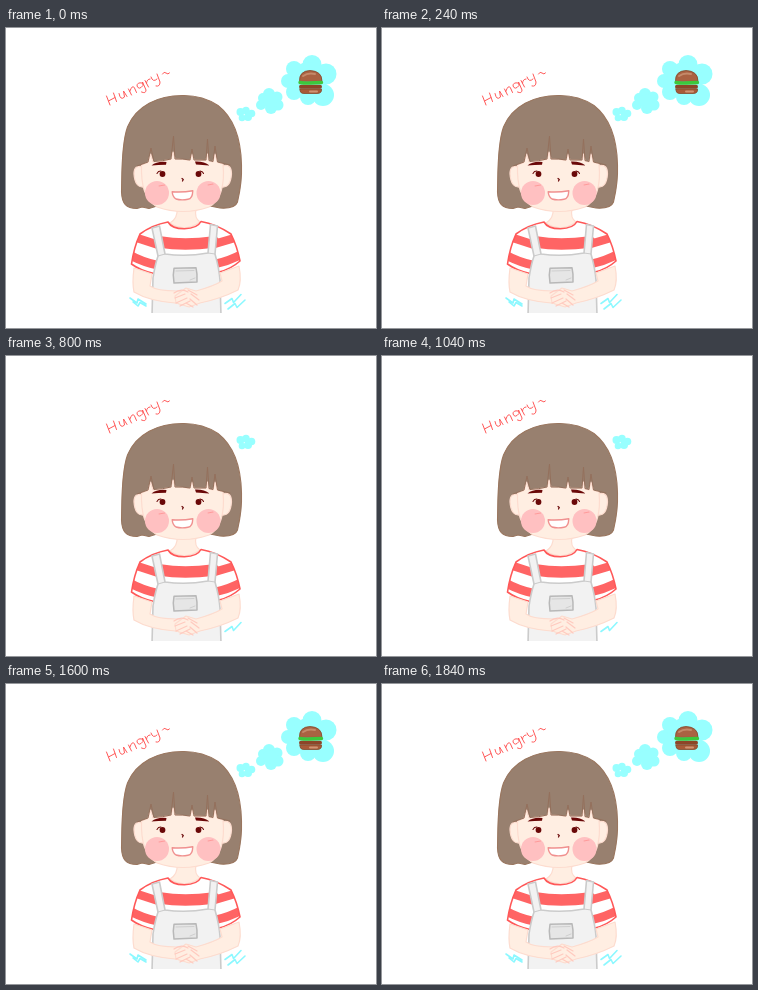
An HTML page that plays this animation: 370 px wide and 300 px high, repeating every 2000 ms.

```html
<!DOCTYPE html>
<html lang="en">
<head>
<meta charset="utf-8">
<title>Hungry~</title>
<style>
html, body { margin: 0; width: 100%; height: 100%; overflow: hidden; background: #fff; }
svg { display: block; width: 370px; height: 300px; }
path, circle { stroke-linecap: round; stroke-linejoin: round; }

/* Five held poses of 400 ms; each part is simply shown or hidden. */
.calm, .sway, .open, .shut, .rest, .clasp, .rub, .first, .second, .last {
  animation: 2s step-end infinite;
}
.calm, .rest { animation-name: calm; }
.sway { animation-name: sway; }
.open { animation-name: open; }
.shut, .rub { animation-name: shut; }
.clasp { animation-name: clasp; }
.first { animation-name: first; }
.second { animation-name: second; }
.last { animation-name: last; }
@keyframes calm { 0%, 40%, 80% { visibility: visible } 20%, 60% { visibility: hidden } }
@keyframes sway { 0%, 40%, 80% { visibility: hidden } 20%, 60% { visibility: visible } }
@keyframes open { 0%, 80% { visibility: visible } 60% { visibility: hidden } }
@keyframes shut { 0%, 80% { visibility: hidden } 60% { visibility: visible } }
@keyframes clasp { 0%, 40%, 100% { visibility: hidden } 20% { visibility: visible } }
@keyframes first { 0%, 40%, 100% { visibility: visible } 20% { visibility: hidden } }
@keyframes second { 0%, 60%, 100% { visibility: visible } 20% { visibility: hidden } }
@keyframes last { 0%, 80% { visibility: visible } 20% { visibility: hidden } }

.hair { fill: #98806f; stroke: #9a765f; stroke-width: 1.1; }
.strand { fill: none; stroke: #94705c; stroke-width: 1; }
.skin { fill: #ffeee2; stroke: #fddccf; stroke-width: 1.2; }
.red { fill: none; stroke: #ff5858; stroke-width: 1.6; }
.letters { stroke-width: 1; }
.stripe { fill: none; stroke: #ff6464; stroke-width: 8.5; stroke-linecap: butt; }
.denim { fill: #f2f2f2; stroke: #cbcbcb; stroke-width: 1.6; }
.dark { fill: none; stroke: #6a0808; }
.ink { fill: #6a0808; }
.finger { fill: none; stroke: #ffcabf; stroke-width: 1.2; }
.cloud { fill: #98ffff; }
.shake { fill: none; stroke: #8cf8ff; stroke-width: 1.6; }
</style>
</head>
<body>
<svg viewBox="0 0 370 300" role="img" aria-label="Hungry~">
  <defs>
    <path id="shirt" d="M162 194 C167 203 190 203 195 193.500 Q210 196 225 206 Q231 218 234 233 Q225 241 213 244 L212 285 L148 285 L148 245.500 Q135 243 125.500 236 Q128 219 134 206 Q146 197 162 194Z"/>
    <clipPath id="inShirt"><use href="#shirt"/></clipPath>
  </defs>

  <!-- Lettering -->
  <g class="red letters">
    <path d="M100.500 68 L104 77 M107.500 65 L110.500 73.500 M102.500 73 L109 69.500"/>
    <path d="M113 65.500 Q114.500 73 118.500 69 L117.500 63 L121 68.500"/>
    <path d="M122.500 61 L125.500 67 M123.700 63.500 Q126.500 56 128.500 60 L130.500 64.500"/>
    <path d="M136 55 Q131 54 131 58 Q133 62.500 137 57.500 L136.500 54 L140 62 Q140 66 135.500 64"/>
    <path d="M139 52.500 L142.500 59 M140.500 55 Q141 51 144 51"/>
    <path d="M145 49 Q147 55 151 51 M151 46 L154 54 Q154 59 150 58"/>
    <path d="M156.500 46 Q158 43 160 45 T163.500 45"/>
  </g>

  <!-- Hair -->
  <path class="hair calm" d="M178 67.500 C152 67 130 78 121.500 99 C115 117 116 148 115.500 164 C116 176 120 180 131 180.500 L136 179 L143 180.500 L151 178 L204 178 L214 180 Q229 181 231.500 174 C235 159 236 150 235.500 137 C235 112 228 90 212 77.500 Q197 67.500 178 67.500Z"/>
  <path class="hair sway" d="M178 67.500 C151 67 128 79 119.500 99 C112 118 115 146 113.700 162 C114 176 119 179 130 180 L136 179 L143 180.500 L151 178 L204 178 L215 180 Q232 181 235 172 C238 156 238 150 237.500 136 C236 110 229 90 212 77 Q197 67.500 178 67.500Z"/>

  <!-- Neck and head -->
  <path class="skin" d="M171 181 Q172 190 164 195 Q179 205 194 194 Q188 190 190 181Z"/>
  <path class="skin" d="M137 139 Q128 136 128 146 Q129 160 138 159Z"/>
  <path class="skin" d="M216 138 Q225.500 135 225.500 146 Q224.500 160 216 159Z"/>
  <path class="skin" d="M135.500 137 L142 134.500 L144.500 126 L147 134 Q156 133 165 131.500 L167 124 L169 131 Q176 131 184 132.500 L186 126 L188 132 L200 132.500 L201.500 126 L203 133 L207 134 L209 126 L211.500 134.500 L217 136 C219 157 215 172 203 179 Q177 188 151 179 C138 171 135 156 135.500 137Z"/>
  <path class="strand" d="M131 138 L142 134 L145 120 L148 133.500 Q157 133 165 131 L167.500 108 L169 131 Q176 130.500 184 132 L186 121 L188 132 L200 132 L201.500 111 L203 132.500 L207 133.500 L209 118 L211.500 134 L224 137"/>

  <!-- Face -->
  <circle cx="151" cy="165" r="12" fill="#ffc0c1"/>
  <circle cx="202.500" cy="165" r="12" fill="#ffc0c1"/>
  <path fill="none" stroke="#ff9b9b" stroke-width="1.100" d="M153 158 L158.500 157 M202 157 L207 156"/>
  <path class="ink" d="M145.500 137.500 Q151 133 160.500 134 L160 136.700 Q152 137 145.500 137.500Z M189 133.500 Q198 133 203.500 137.500 Q197 137 190 136.500Z"/>
  <g class="open">
    <circle class="ink" cx="156.500" cy="146" r="2.900"/>
    <circle class="ink" cx="192.500" cy="146" r="2.900"/>
    <path class="dark" stroke-width="1.100" d="M151 145.500 L152.500 143.500 L155 143 M194 143 L196.500 144 L197.500 145.500"/>
  </g>
  <path class="dark shut" stroke-width="1.700" d="M148.500 148 Q153 140.500 158 147.500 M191.500 147 Q196 140 200.500 147"/>
  <path class="dark" stroke-width="1.200" d="M176 150.500 L177.300 151.500 L176.500 153"/>
  <path fill="#fff" stroke="#f0908f" stroke-width="1.400" d="M166.200 163.800 Q177 164.500 186.800 162.800 Q186.500 171 182 171.300 Q175 172.500 170 171 Q166.500 169 166.200 163.800Z"/>

  <!-- Clothes -->
  <use href="#shirt" fill="#fff"/>
  <g class="stripe" clip-path="url(#inShirt)">
    <path d="M154 214 Q178 218 208 214" stroke-width="11.500"/>
    <path d="M128 209 L151 216.500 M210 215.500 L232 209"/>
    <path d="M122 226 Q136 234 151 237 M209 236 Q224 233 238 225"/>
  </g>
  <path class="red" d="M148 245.500 Q135 243 125.500 236 Q128 219 134 206 Q146 197 162 194 C167 203 190 203 195 193.500 Q210 196 225 206 Q231 218 234 233 Q225 241 213 244"/>
  <path class="denim" d="M146 200 L153.500 198 L159 226 Q180 229 202 225 L204.500 196.500 L211.500 198 L209 226 Q213 240 214 252 L215 288 L146 288 L147 250 Q149 237 152 228Z"/>
  <path fill="none" stroke="#cbcbcb" stroke-width="1.200" d="M152 228 L159 226 M202 225 L209 226"/>
  <path fill="#e6e6e6" stroke="#b8b8b8" stroke-width="1.500" d="M168 240.300 L190 239.700 Q191.500 246 191 254 L168 255 Q166.500 247 168 240.300Z"/>
  <path fill="none" stroke="#cfcfcf" d="M170 243 L188 242.500 M184 252 L189 250"/>
  <path fill="#fff" d="M140 285 H222 V291 H140Z"/>

  <!-- Arms and hands -->
  <g class="rest">
    <path class="skin" d="M128 240 Q126 255 128 264 Q143 273 169 275 L180 277 L186 264 L171 263 Q151 263 144 258 L146 246Z"/>
    <path class="skin" d="M233 238 Q236 253 232 262 Q214 271 194 275 L183 279 L170 275 L169 268 L180 260 L190 263 Q208 258 216 253 L214 245Z"/>
    <path class="finger" d="M168 265 Q175 260 182 264 M169 270 L179 266 M170 275 L181 270 M174 278 L184 273 M182 262 L191 267 M185 266 L193 272 M184 271 L191 277 M180 275 L187 279"/>
  </g>
  <g class="clasp">
    <path class="skin" d="M128 240 Q126 255 128 263 Q143 272 168 274 L181 279 L187 265 L171 264 Q151 263 144 258 L146 246Z"/>
    <path class="skin" d="M233 238 Q236 253 232 261 Q214 269 195 272 L185 279 L172 279 L169 271 L183 258 L191 261 Q208 257 216 252 L214 245Z"/>
    <path class="finger" d="M168 267 Q174 261 181 263 L186 257 M169 271 L180 267 M171 275 L182 271 M174 279 L184 274 M183 262 L190 267 M186 266 L193 270 M185 271 L190 276"/>
  </g>
  <g class="rub">
    <path class="skin" d="M127 240 Q124 255 127 266 Q143 273 166 276 L180 281 L188 266 L172 262 Q151 265 142 260 L146 246Z"/>
    <path class="skin" d="M233 238 Q236 253 232 264 Q213 271 194 273 L184 280 L171 282 L167 272 L180 259 L190 262 Q208 260 217 255 L214 245Z"/>
    <path class="finger" d="M166 268 Q173 262 182 257 M168 273 L179 266 M169 278 L182 270 M174 282 L185 274 M182 261 L190 267 M186 266 L193 271 M186 271 L191 277"/>
  </g>

  <!-- Shaking marks -->
  <path class="shake last" d="M124 270 L131 275 L132 271 L140 276 M127 274 L132 278 L134 274.500 L140 278"/>
  <path class="shake first" d="M219 275.500 L226 270.500 L227.500 274.500 L235 266.500"/>
  <path class="shake second" d="M222 281 L229 275.500 L231 279.500 L239 272"/>

  <!-- Thought bubbles -->
  <g class="cloud first">
    <circle cx="234.500" cy="84" r="4"/><circle cx="240" cy="82.500" r="3.700"/><circle cx="245.500" cy="85.500" r="3.800"/>
    <circle cx="242" cy="89" r="4"/><circle cx="236" cy="90" r="3.300"/>
  </g>
  <g class="cloud second">
    <circle cx="263" cy="66" r="6"/><circle cx="271" cy="69" r="5.500"/><circle cx="272" cy="77" r="5.500"/>
    <circle cx="265" cy="80" r="6"/><circle cx="255" cy="77" r="5"/><circle cx="257" cy="70" r="5"/>
    <circle cx="264" cy="73" r="7"/>
  </g>
  <g class="last">
    <g class="cloud">
      <circle cx="306" cy="36.500" r="9.500"/><circle cx="320" cy="46" r="10.500"/><circle cx="317" cy="67" r="11"/>
      <circle cx="302" cy="69" r="8"/><circle cx="288" cy="64" r="8"/><circle cx="282" cy="53" r="7"/>
      <circle cx="288" cy="41" r="8"/><circle cx="303" cy="52" r="18"/>
    </g>
    <path fill="#aa6242" stroke="#854a2c" stroke-width=".8" d="M293.500 53 Q293 43 304 42.500 Q316 43 316 53Z"/>
    <path fill="none" stroke="#c48a6a" stroke-width="2" d="M297 48 Q302 44.500 309 46"/>
    <path fill="#a85a38" stroke="#854a2c" stroke-width=".8" d="M294 61 H315.500 Q316 65.500 311 65.500 H298 Q293.500 65.500 294 61Z"/>
    <path fill="none" stroke="#cf9474" stroke-width="2" d="M304 63.500 H311"/>
    <path fill="none" stroke="#8c4528" stroke-width="4" d="M295 58.800 H314"/>
    <path fill="none" stroke="#3cc83c" stroke-width="3.400" d="M294 54.500 Q300 55.500 304 55 T315.500 54.500"/>
  </g>
</svg>
</body>
</html>
```
